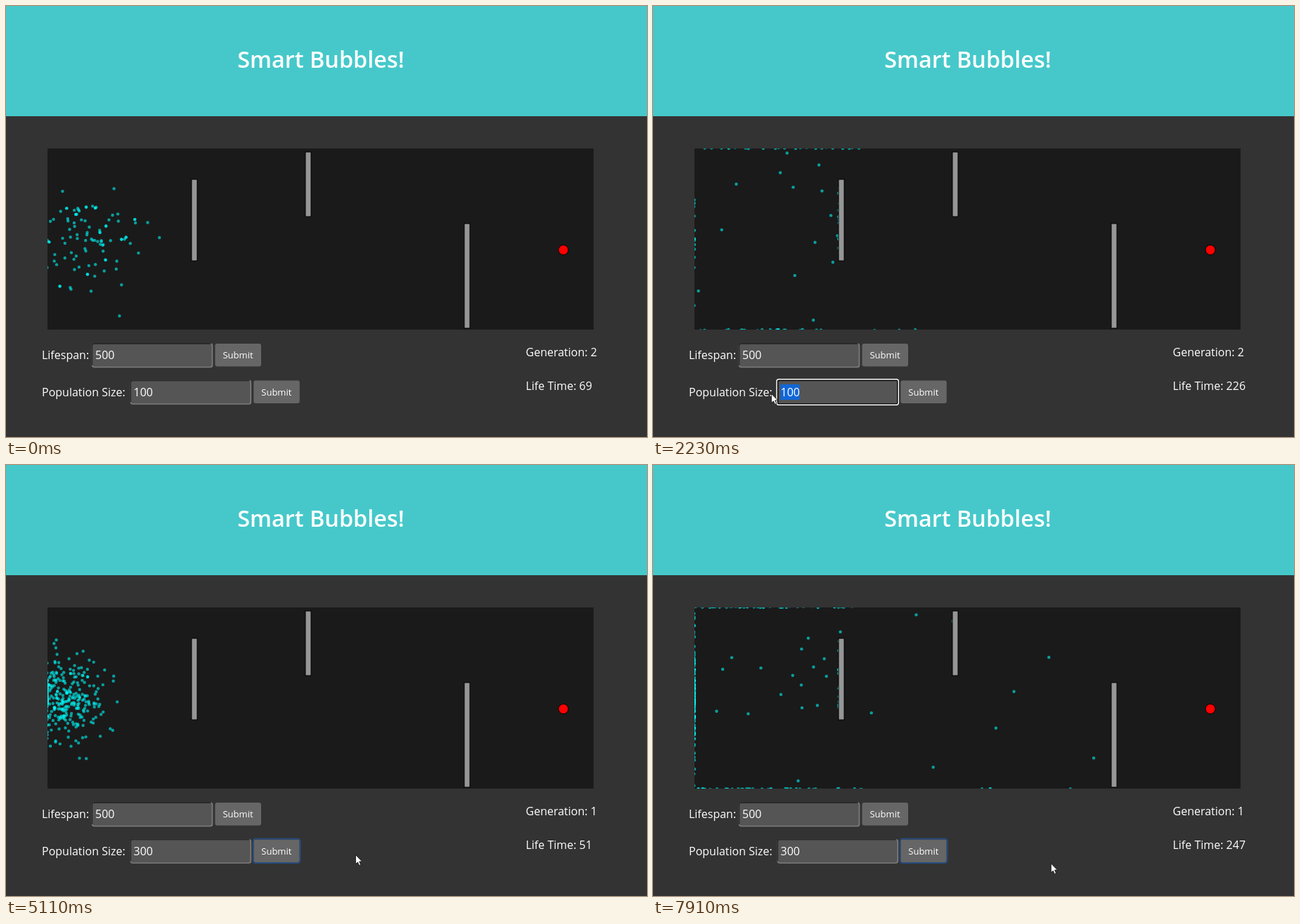
Write an HTML page with a canvas that moves like this. It is 912 px wide and 614 px high and loops after 7990 ms.

```html
<!DOCTYPE html>
<html lang="en">
<head>
<meta charset="utf-8">
<title>Smart Bubbles!</title>
<style>
  html, body { margin: 0; width: 100%; height: 100%; overflow: hidden; background: #333; }
  svg, canvas { position: absolute; left: 0; top: 0; display: block; }
  canvas { left: 59px; top: 203px; }
  text { font: 16px "Open Sans", "Noto Sans", sans-serif; fill: #fff; }
  .title { font-size: 32.4px; font-weight: 600; text-anchor: middle; }
  .button { font-size: 13px; text-anchor: middle; }
</style>
</head>
<body>
<svg width="912" height="614" viewBox="0 0 912 614">
  <defs>
    <g id="field">
      <rect x="1" y="1" width="171" height="33.5" rx="3" fill="#555" stroke="#7c7c7c" stroke-width="1.7"/>
      <path d="M1 32V4Q1 1 4 1H170" fill="none" stroke="#2a2a2a" stroke-width="1.8"/>
      <rect x="176" y="1" width="65.5" height="32.5" rx="3" fill="#666"/>
      <text class="button" x="208.5" y="22">Submit</text>
    </g>
  </defs>
  <rect width="912" height="157" fill="#46c8ca"/>
  <text class="title" x="448" y="88">Smart Bubbles!</text>

  <text x="51" y="503">Lifespan:</text>
  <use href="#field" x="121.5" y="480"/>
  <text x="127" y="503">500</text>

  <text x="51" y="555.5">Population Size:</text>
  <use href="#field" x="176.3" y="532.5"/>
  <g id="inputFocus" fill="none">
    <rect x="177.5" y="533" width="170.5" height="34" rx="2" stroke="#111" stroke-width="2"/>
    <rect x="176" y="531.7" width="173.3" height="36.6" rx="3" stroke="#fff" stroke-width="1.4"/>
  </g>
  <rect id="buttonFocus" x="351.5" y="532.5" width="67" height="34.5" rx="3.5" fill="none" stroke="#264a7c" stroke-width="2"/>
  <rect id="selection" y="539" height="22" fill="#1167d8"/>
  <text id="population" x="181.5" y="556"></text>

  <text id="generation" x="739.5" y="499"></text>
  <text id="lifetime" x="739.5" y="547"></text>

  <g id="cursor">
    <path id="arrow" d="M.5 .5V13.5L3.4 10.8L5.5 15.4L7.7 14.4L5.7 9.9H9.6Z" fill="#fff" stroke="#111" stroke-width=".8"/>
    <path id="beam" d="M-3 -6.5H3M0 -6.5V6.5M-3 6.5H3" fill="none" stroke="#ddd"/>
  </g>
</svg>
<canvas id="stage" width="777" height="258"></canvas>

<script>
const LOOP = 7990, ENTER = 500, DRAG = 1500, HIDE = 2310, TYPING = 2470, RETURN = 3270, RESTART = 4390;
const LIFE_PER_MS = 0.0701;
const FIELD = { left: 59, top: 203, right: 836, bottom: 461 };
const WALLS = [[264, 247, 8, 116], [426, 208, 8, 92], [652, 310, 8, 149]];

const $ = id => document.getElementById(id);
const clamp = (v, lo, hi) => Math.max(lo, Math.min(hi, v));
const show = (id, on) => $(id).setAttribute('visibility', on ? 'visible' : 'hidden');

function hash(a, b) {
  let h = Math.imul(a + 1, 0x9E3779B1) ^ Math.imul(b + 1, 0x85EBCA77);
  h = Math.imul(h ^ h >>> 15, 0x2C1B3C6D);
  h = Math.imul(h ^ h >>> 12, 0x297A2D39);
  return ((h ^ h >>> 15) >>> 0) / 2 ** 32;
}

const blocked = (x, y) =>
  x < FIELD.left || x > FIELD.right || y < FIELD.top || y > FIELD.bottom ||
  WALLS.some(([wx, wy, w, h]) => x > wx && x < wx + w && y > wy && y < wy + h);

// Randomly accelerated bubble that sticks to whatever it hits.
// Inherited genes make some neighbours move together until they split.
function walk(id, { steps, force, drift, inherited }) {
  let x = 82, y = 332, vx = 0, vy = 0;
  const path = [];
  const split = id & 2 ? 0 : inherited * hash(id >> 1, steps);
  for (let step = 0; step < steps; step++) {
    path.push([x, y]);
    if (blocked(x, y)) continue;
    const angle = 2 * Math.PI * hash(step < split ? id & ~1 : id, step);
    vx += force * Math.cos(angle) + (step < 60 ? drift : 0);
    vy += force * Math.sin(angle);
    x += vx;
    y += vy;
  }
  return path;
}

const breed = (count, genes) => Array.from({ length: count }, (_, id) => walk(id, genes));
const evolved = breed(100, { steps: 380, force: 0.15, drift: 0.017, inherited: 110 });
const fresh = breed(300, { steps: 260, force: 0.2, drift: 0, inherited: 0 });

// Pointer stops: time, x, y.
const POINTER = [
  [ENTER, 247, 614], [800, 244, 587], [DRAG, 212, 550], [2230, 168, 552], [RETURN, 230, 552],
  [3830, 294, 566], [RESTART, 385, 553], [5110, 497, 555], [6630, 531, 570], [LOOP, 568, 567]
];

function pointerAt(t) {
  const next = Math.max(1, POINTER.findIndex(stop => stop[0] > t));
  const [t0, x0, y0] = POINTER[next - 1], [t1, x1, y1] = POINTER[next];
  const k = (t - t0) / (t1 - t0);
  return [x0 + (x1 - x0) * k, y0 + (y1 - y0) * k];
}

function drawForm(t) {
  const typed = clamp(1 + Math.floor((t - TYPING) / 200), 0, 3);
  $('population').textContent = typed ? '300'.slice(0, typed) : '100';
  show('inputFocus', t >= DRAG && t < RESTART);
  show('buttonFocus', t >= RESTART);

  const [x, y] = pointerAt(t);
  const selected = clamp(Math.round((208 - x) / 9), 0, 3) * 9;
  show('selection', t >= DRAG && t < TYPING && selected > 0);
  $('selection').setAttribute('x', 208.5 - selected);
  $('selection').setAttribute('width', selected);

  const visible = t >= ENTER && (t < HIDE || t >= RETURN);
  const overInput = x > 177 && x < 349 && y > 532 && y < 568;
  show('arrow', visible && !overInput);
  show('beam', visible && overInput);
  $('cursor').setAttribute('transform', `translate(${x} ${y})`);
}

const ctx = $('stage').getContext('2d');
ctx.translate(-FIELD.left, -FIELD.top);

function disc(x, y, r) {
  ctx.beginPath();
  ctx.arc(x, y, r, 0, 2 * Math.PI);
  ctx.fill();
}

function drawField(bubbles, life) {
  ctx.fillStyle = '#1a1a1a';
  ctx.fillRect(FIELD.left, FIELD.top, 777, 258);
  ctx.fillStyle = 'rgba(0, 255, 255, 0.58)';
  for (const path of bubbles) disc(...path[life], 2.2);
  ctx.strokeStyle = '#000';
  ctx.fillStyle = '#969696';
  for (const wall of WALLS) {
    ctx.fillRect(...wall);
    ctx.strokeRect(...wall);
  }
  ctx.fillStyle = '#f00';
  disc(793, 347.5, 7);
  ctx.stroke();
}

function render(now) {
  const elapsed = now % LOOP;
  const t = elapsed < 70 ? 0 : 70 + 80 * Math.floor((elapsed - 70) / 80);
  const restarted = t >= RESTART;
  const life = Math.floor(restarted ? 0.7 + LIFE_PER_MS * (t - RESTART) : 69.9 + LIFE_PER_MS * t);
  $('generation').textContent = `Generation: ${restarted ? 1 : 2}`;
  $('lifetime').textContent = `Life Time: ${life}`;
  drawForm(t);
  drawField(restarted ? fresh : evolved, life);
}

const begin = performance.now();
(function tick() {
  render(performance.now() - begin);
  requestAnimationFrame(tick);
})();
</script>
</body>
</html>
```
